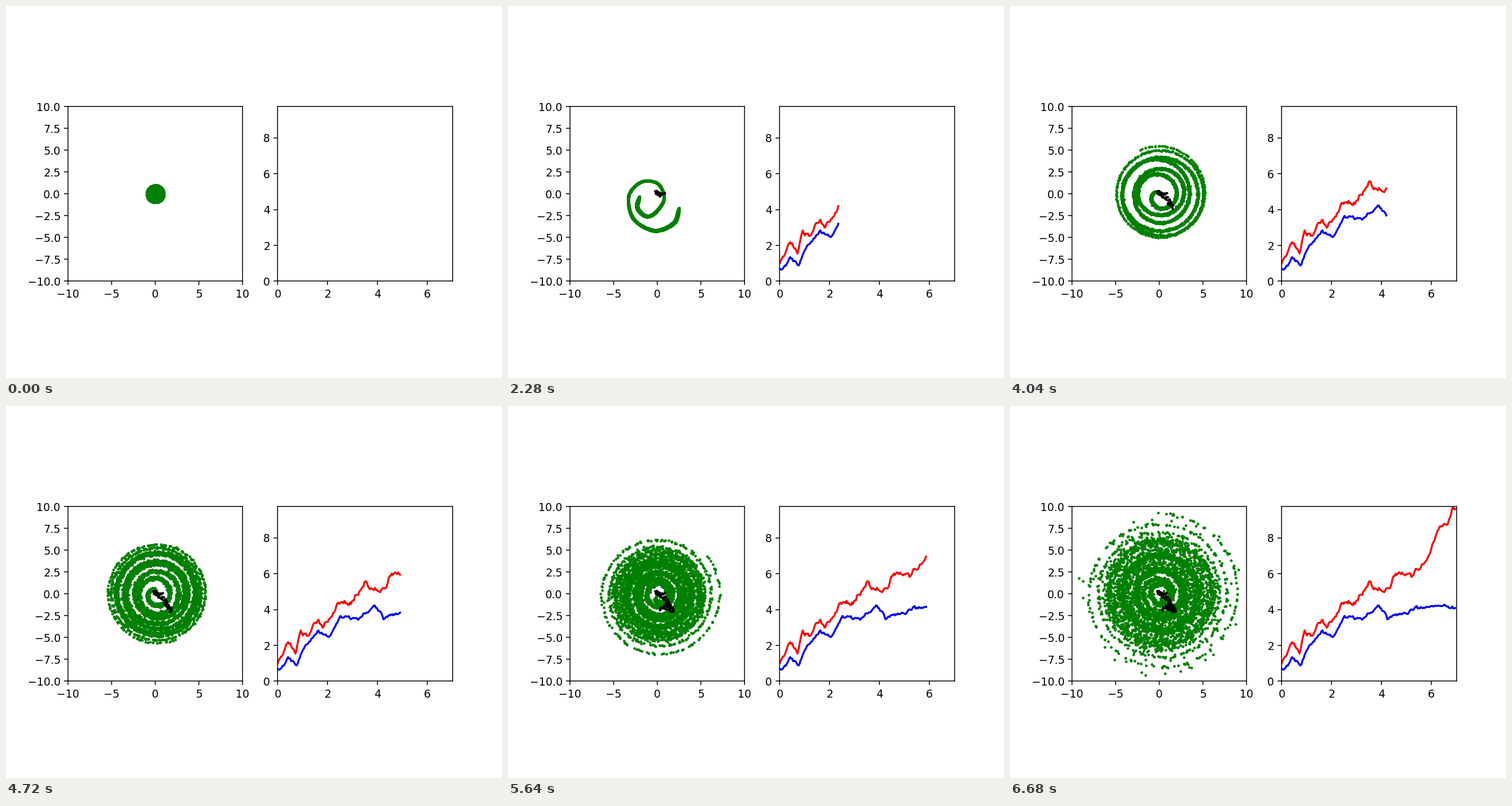
Animation, 864 px wide and 648 px high, one loop 6720 ms. Source, as a matplotlib script:

```python
import numpy as np
import matplotlib.pyplot as plt
from matplotlib.animation import FuncAnimation

FRAMES, COUNT = 168, 5000
KEYS = [0, 31, 57, 84, 118, 141, 167]
rng = np.random.default_rng(7)


def curve(pts, u):
    """Catmull-Rom curve through complex points."""
    p = np.array(pts)
    p = np.concatenate([[2 * p[0] - p[1]], p, [2 * p[-1] - p[-2]]])
    s = u * (len(pts) - 1)
    i = np.minimum(s.astype(int), len(pts) - 2)
    f = s - i
    a, b, c, d = p[i], p[i + 1], p[i + 2], p[i + 3]
    return 0.5 * (2 * b + (c - a) * f + (2 * a - 5 * b + 4 * c - d) * f**2
                  + (3 * b - a - 3 * c + d) * f**3)


# Disc of particles, sorted so that u runs along it and v across it
disc = np.sqrt(rng.random(COUNT)) * np.exp(2j * np.pi * rng.random(COUNT))
disc = disc[np.argsort(disc.real)]
u = np.linspace(0, 1, COUNT)
v = disc.imag / np.sqrt(1 - disc.real**2 + 1e-9)
cap = np.sqrt(1 - (2 * u - 1) ** 8)


def ribbon(mid, half, start):
    """Polar positions on a ribbon of given half-width along mid."""
    tan = np.gradient(mid)
    pos = mid + 1j * tan / (abs(tan) + 1e-9) * v * half * cap
    ang = np.unwrap(np.angle(mid))
    return abs(pos), ang + np.radians(start) - ang[0] + np.angle(pos / mid)


def spiral(start, core, tail, turns, gap, pitch, noise, center=0):
    """Clockwise spiral: a thin tail, then a core bunched into rings."""
    out = np.exp(-u / 0.05)
    r = 0.5 + (core - 0.5) * (1 - u) ** 0.65
    k = 2 * np.pi / pitch
    r = r + 0.85 * np.sin(k * (r - gap)) / k + tail * out
    r = r + noise * (1 - 0.8 * out) * rng.normal(size=COUNT)
    ang = np.radians(start) - 2 * np.pi * (turns * u + 1.5 * (1 - out))
    ang += 0.3 * noise * rng.normal(size=COUNT)
    unit = np.exp(1j * ang)
    pos = center + r * unit
    return abs(pos), ang + np.angle(pos / unit)


arch = -.1 + .4j + (1.82 - .3 * u**2) * np.exp(1j * np.radians(205 - 195 * u))
curl = curve([2.5 - 1.6j, 1.9 - 3.3j, -.3 - 4.2j, -2.7 - 2.9j, -3.3 - .3j,
              -1.9 + 1.35j, 0 + 1.2j, .75 - .5j, -.2 - 2.1j, -1.3 - 2.55j,
              -2.3 - 1.6j, -2.05 - .3j], u)

poses = [ribbon(arch, .1 + .35 * u, 190),
         ribbon(curl, .04 + .14 * (2 * u - 1) ** 2, -33),
         spiral(-424, 4.3, .6, 2, 3.6, 1.3, .07, -.1 - .5j),
         spiral(-789, 5.3, .3, 7, 3.0, 1.05, .1, .2 + .1j),
         spiral(-1042, 5.2, 2.1, 11, 4.3, 1.2, .13, .1 - .1j),
         spiral(-1348, 6.5, 2.8, 16, 5.1, 1.6, .15, .1 + .1j)]
radius = np.array([p[0] for p in poses])
angle = np.array([p[1] for p in poses])

# A few particles are thrown outwards at the end
loose = rng.random(COUNT) < .016
radius[5, loose] = rng.uniform(6.5, 9.5, loose.sum())
arc = radius[0] * np.exp(1j * angle[0])


def particles(n):
    if n <= KEYS[1]:
        k = n / KEYS[1]
        return np.exp(-2j * np.pi * k) * (disc + (arc - disc) * k**2)
    j = np.searchsorted(KEYS, n) - 1
    k = (n - KEYS[j]) / (KEYS[j + 1] - KEYS[j])
    r = radius[j - 1] + (radius[j] - radius[j - 1]) * k
    a = angle[j - 1] + (angle[j] - angle[j - 1]) * k
    return r * np.exp(1j * a)


def rough(x, points, noise):
    """Line through (x, y) points with short-memory noise."""
    px, py = np.transpose(points)
    wobble = np.convolve(rng.normal(0, noise, FRAMES), [1, .6, .3])[:FRAMES]
    wobble[0] = 0
    return np.interp(x, px, py) + wobble


t = np.linspace(0, 7, FRAMES)
high = rough(t, [(0, 1), (.42, 2.2), (.7, 1.7), (.92, 2.65), (1.25, 2.5),
                 (1.6, 3.5), (1.78, 2.9), (2.5, 4.4), (2.85, 4.2), (3.55, 5.5),
                 (3.75, 5.1), (4.3, 5.1), (4.6, 6.05), (5.2, 5.95),
                 (5.78, 6.75), (6.1, 7.7), (6.35, 8.75), (6.65, 8.75),
                 (6.88, 9.65), (7, 9.6)], .06)
mean = rough(t, [(0, .7), (.25, .8), (.42, 1.35), (.78, .9), (1.05, 1.85),
                 (1.6, 2.75), (2.1, 2.5), (2.5, 3.6), (3.25, 3.45),
                 (3.88, 4.2), (4.25, 3.55), (5, 3.8), (5.4, 4.1),
                 (6.5, 4.2), (7, 4.1)], .045)

step = np.arange(FRAMES)
walk_x = rough(step, [(0, 0), (8, -.2), (31, .4), (44, .7), (57, 0), (84, 1.2),
                      (118, 1.8), (141, .4), (156, 1.8), (167, 1.4)], .11)
walk_y = rough(step, [(0, 0), (14, .3), (24, -.3), (44, .1), (60, 0),
                      (84, -1), (118, -2.1), (130, -1.4), (141, -1.9),
                      (167, -1.7)], .11)

fig, (left, right) = plt.subplots(1, 2, figsize=(6.4, 4.8), dpi=135)
left.set(xlim=(-10, 10), ylim=(-10, 10), aspect="equal")
right.set(xlim=(0, 7), ylim=(0, 9.76), box_aspect=1)
dots, = left.plot([], [], ".", color="g", markersize=3)
trail, = left.plot([], [], "k", lw=1.8)
red, = right.plot([], [], "r", lw=1.8)
blue, = right.plot([], [], "b", lw=1.8)


def draw(n):
    z = particles(n)
    dots.set_data(z.real, z.imag)
    trail.set_data(walk_x[:n], walk_y[:n])
    red.set_data(t[:n], high[:n])
    blue.set_data(t[:n], mean[:n])
    return dots, trail, red, blue


anim = FuncAnimation(fig, draw, frames=FRAMES, interval=40,
                     init_func=lambda: draw(0), repeat=True, repeat_delay=0)
plt.show()
```
